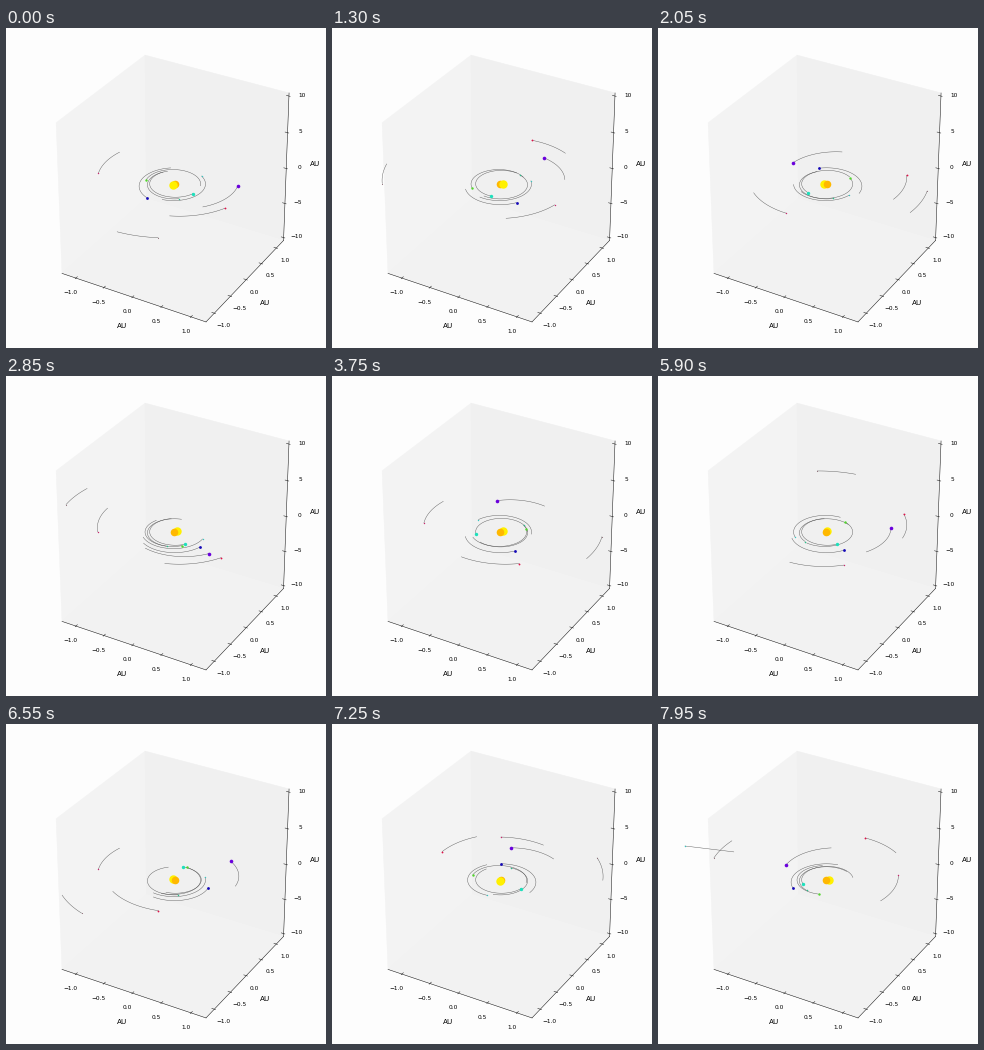
Write a matplotlib script that moves like this. It is 320 px wide and 320 px high and loops after 8 s.

```python
import numpy as np
import matplotlib.pyplot as plt
from matplotlib.animation import FuncAnimation

SIZE, DPI = 320, 100
FRAMES, STEP = 160, 50
TRAIL = 100            # ms of path drawn behind each planet
ESCAPE = 7650          # ms at which one planet is flung out
PT = 72 / DPI          # points per pixel
CX, CY = 168.5, 156    # centre of the system on screen
TILT = 0.52            # foreshortening of the orbital plane

fig = plt.figure(figsize=(SIZE / DPI, SIZE / DPI), dpi=DPI, facecolor="#fdfdfd")
ax = fig.add_axes([0, 0, 1, 1])
ax.set_xlim(0, SIZE)
ax.set_ylim(SIZE, 0)
ax.axis("off")


# ---- the box -------------------------------------------------------------
def project(x, y, z):
    """Perspective view (elev 30, azim -60) of a unit cube around 0."""
    depth = 10 / (10 - (0.433 * x - 0.75 * y + 0.5 * z))
    right = 0.866 * x + 0.5 * y
    up = -0.25 * x + 0.433 * y + 0.866 * z
    return CX + 166.2 * right * depth, CY - 172 * up * depth


def pane(shade, *corners):
    pts = [project(*c) for c in corners]
    ax.fill(*zip(*pts), facecolor=shade, edgecolor=shade, lw=0.5 * PT, zorder=0)


def line(a, b):
    (x0, y0), (x1, y1) = project(*a), project(*b)
    ax.plot([x0, x1], [y0, y1], color="#111111", lw=0.5 * PT, zorder=1)


def text(x, y, s, px):
    ax.text(x, y, s, fontsize=px * PT, family="DejaVu Sans", color="black",
            ha="center", va="center", zorder=1)


def tick(start, end, anchor, value, decimals):
    line(start, end)
    x, y = project(*anchor)
    text(x, y + 1, f"{value:.{decimals}f}".replace("-", "\u2212"), 5.9)


H = 0.5
IN, OUT, LABEL = H - 0.0167, H + 0.0083, H + 0.06
pane("#f3f3f3", (-H, -H, -H), (-H, -H, H), (-H, H, H), (-H, H, -H))
pane("#f0f0f0", (-H, H, -H), (-H, H, H), (H, H, H), (H, H, -H))
pane("#f2f2f2", (-H, -H, -H), (H, -H, -H), (H, H, -H), (-H, H, -H))
line((-H, -H, -H), (H, -H, -H))
line((H, -H, -H), (H, H, -H))
line((H, H, -H), (H, H, H))

for k in range(-2, 3):
    u, w = k / 5, k * 0.24
    tick((u, -IN, -H), (u, -OUT, -H), (u, -LABEL, -LABEL), k / 2, 1)
    tick((IN, u, -H), (OUT, u, -H), (LABEL, u, -LABEL), k / 2, 1)
    tick((IN, H, w), (OUT, H, w), (LABEL, LABEL, w), 5 * k, 0)
for x, y in ((116, 298), (259, 275), (309, 136)):
    text(x, y, "AU", 7.3)


# ---- motion --------------------------------------------------------------
def orbit(t, a, ecc, peri, start):
    """Kepler orbit; the mean motion (deg/ms) follows from its size a."""
    rate = 247.4 / a ** 1.5
    m = np.radians(start + rate * t)
    e = m
    for _ in range(8):
        e = m + ecc * np.sin(e)
    p = np.radians(peri)
    x = a * (np.cos(e + p) - ecc * np.cos(p))
    y = a * (np.sin(e + p) - ecc * np.sin(p))
    return CX + x, CY - TILT * y


def fling(t, *elements):
    """Orbit until ESCAPE, then a straight flight out to the left."""
    x, y = orbit(np.minimum(t, ESCAPE), *elements)
    s = np.maximum(0, (t - ESCAPE) / (FRAMES * STEP - STEP - ESCAPE))
    return x + s * (27 - x), y + s * (122 - y)


# path, (size, eccentricity, periapsis, start), colour, diameter in px
PLANETS = [
    (orbit, (110.5, 0.095, -41, -49), "#8a6a74", 1.1),
    (orbit, (75.4, 0.19, 250, 48), "#e01048", 1.8),
    (orbit, (74.5, 0.115, -72, 248), "#c8286e", 1.4),
    (orbit, (54.65, 0.222, 217, 122), "#6a00dc", 3.6),
    (orbit, (35.4, 0.12, 90, 123), "#1408b8", 2.8),
    (fling, (31.93, 0.03, 0, 28), "#3cc4c0", 1.4),
    (orbit, (27.8, 0.06, 0, 162), "#52d62c", 2.4),
    (orbit, (27.05, 0.06, 90, 190), "#2cc08c", 1.5),
    (orbit, (25.8, 0.04, 200, 110), "#1ee0bc", 3.4),
]


def dot(color, px, z):
    return ax.plot([], [], "o", color=color, ms=px * PT, mew=0, zorder=z)[0]


trails = [ax.plot([], [], color="#555555", lw=0.42 * PT, zorder=3)[0]
          for _ in PLANETS]
dots = [dot(color, px, 6) for *_, color, px in PLANETS]
yellow, orange = dot("#fff000", 8.4, 4), dot("#ffb800", 7.6, 4.5)


def update(i):
    t = i * STEP
    past = np.linspace(t - TRAIL, t, 50)
    for (path, elements, *_), trail, body in zip(PLANETS, trails, dots):
        x, y = path(past, *elements)
        trail.set_data(x, y)
        body.set_data(x[-1:], y[-1:])

    # twin stars: the one nearer the viewer hides the other
    a = np.radians(233 + 1.194 * t)
    dx, dy = 2.7 * np.cos(a), -2.7 * TILT * np.sin(a)
    yellow.set_data([CX + dx], [CY + dy])
    orange.set_data([CX - 0.3 * dx], [CY - 0.3 * dy])
    yellow.set_zorder(5 if np.sin(a) < 0 else 4)
    return [*trails, *dots, yellow, orange]


anim = FuncAnimation(fig, update, frames=FRAMES, interval=STEP,
                     repeat=True, repeat_delay=0, blit=False)
plt.show()
```
